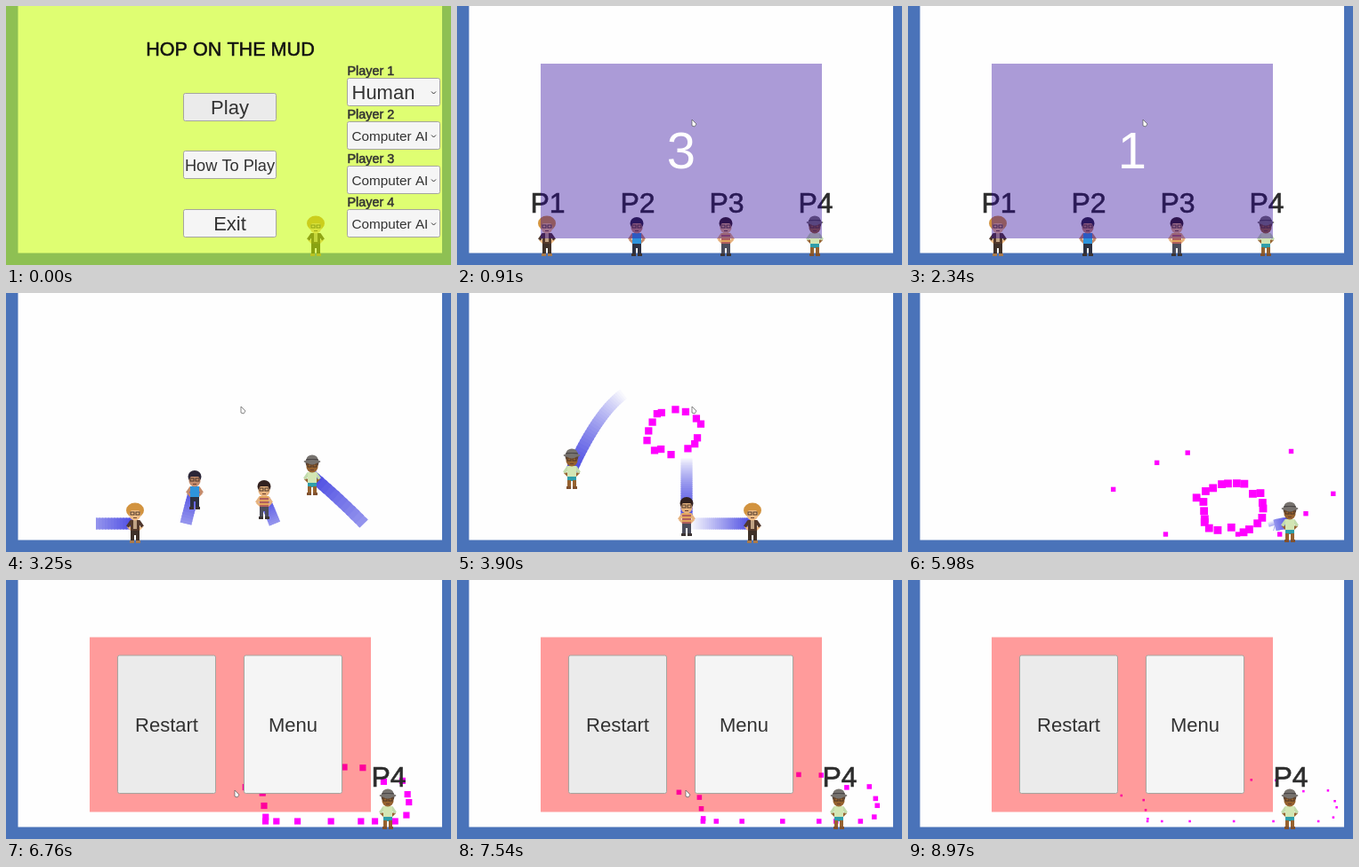
Animation, 500 px wide and 292 px high, one loop 9100 ms. Source, as an HTML page with a canvas:

```html
<!DOCTYPE html>
<html lang="en">
<head>
<meta charset="utf-8">
<title>Hop on the mud</title>
<style>
html, body { margin: 0; width: 100%; height: 100%; overflow: hidden; background: #fff; }
canvas { display: block; }
</style>
</head>
<body>
<canvas id="stage" width="500" height="292"></canvas>
<script>
const ctx = document.getElementById('stage').getContext('2d');
const LOOP = 9100, STEP = 130, TRAIL = 300;
const GAME = 390, TWO = 1300, ONE = 2340, START = 3120, OVER = 6370;
const FLOOR = 278, REST = 255, INK = '#323232';

// A path lists a few key points: time, x, y. A player with a burst breaks apart at the last one.
const players = [
  { name: 'P1', hair: '#d2933f', skin: '#efbd86', shirt: '#54392b', sleeve: '#4f382e', front: '#c0a284', legs: '#3f3129', shoes: '#a97a4c', curls: true,
    path: [[START, 101, 260], [3600, 262, 260], [3900, 332, 260], [4640, 175, 236], [4790, 130, 261], [4940, 167, 260], [5300, 352, 235]],
    burst: { count: 9, reach: 215, size: 6.8, life: 1200 } },
  { name: 'P2', hair: '#2b2637', skin: '#c48c6c', shirt: '#2e94dc', sleeve: '#c48c6c', legs: '#2d3142', shoes: '#3c3230',
    path: [[START, 202, 260], [3640, 243, 148]],
    burst: { count: 15, reach: 115, size: 8.8, life: 1800 } },
  { name: 'P3', hair: '#32211f', skin: '#e6b27e', shirt: '#e2a55c', sleeve: '#e6b27e', stripes: '#b0605e', legs: '#4c4d5b', shoes: '#3b3434',
    path: [[START, 302, 260], [3600, 258, 186], [3900, 258, 252], [4640, 180, 194], [4790, 134, 150], [4940, 166, 131], [5700, 362, 240]],
    burst: { count: 22, reach: 130, size: 9.4, life: 3400 } },
  { name: 'P4', hair: '#55433a', skin: '#96622f', shirt: '#d3e6b4', sleeve: '#c3dcae', legs: '#2f9eaa', shoes: '#80512f', hat: '#77736f',
    path: [[START, 402, 260], [3600, 187, 114], [3900, 129, 199], [4640, 353, 135], [4940, 402, 240], [5850, 412, 262], [5980, 429, 259]] }
];

const mix = (a, b, u) => a + (b - a) * u;
const clamp = (v, lo, hi) => Math.max(lo, Math.min(hi, v));
const deathOf = p => p.burst ? p.path.at(-1)[0] : Infinity;

function seeded(seed) {
  return () => {
    const v = Math.sin(++seed * 78.233) * 43758.5453;
    return v - Math.floor(v);
  };
}

function rect(color, x, y, w, h) {
  ctx.fillStyle = color;
  ctx.fillRect(x, y, w, h);
}

function oval(color, x, y, rx, ry) {
  ctx.fillStyle = color;
  ctx.beginPath();
  ctx.ellipse(x, y, rx, ry, 0, 0, 2 * Math.PI);
  ctx.fill();
}

function line(color, width, ...points) {
  ctx.strokeStyle = color;
  ctx.lineWidth = width;
  ctx.beginPath();
  points.forEach(p => ctx.lineTo(...p));
  ctx.stroke();
}

function text(str, x, y, size, color = INK, align = 'center', weight = 0) {
  ctx.font = `${size}px "Liberation Sans", Arial, sans-serif`;
  ctx.textAlign = align;
  ctx.fillStyle = ctx.strokeStyle = color;
  ctx.lineWidth = weight;
  ctx.fillText(str, x, y);
  if (weight) ctx.strokeText(str, x, y);
}

function box(x, y, w, h, fill = '#f5f5f5') {
  ctx.beginPath();
  ctx.roundRect(x + .5, y + .5, w - 1, h - 1, 2);
  ctx.fillStyle = fill;
  ctx.fill();
  ctx.strokeStyle = '#a5a59f';
  ctx.lineWidth = 1;
  ctx.stroke();
}

// Steady in x; in y, falls speed up and rises slow down
function position(path, t) {
  const next = path.findIndex(key => key[0] > t);
  if (next < 1) return path.at(next && -1).slice(1);
  const [t0, x0, y0] = path[next - 1], [t1, x1, y1] = path[next];
  const u = (t - t0) / (t1 - t0);
  return [mix(x0, x1, u), mix(y0, y1, u * (y1 > y0 ? 1 + u : 3 - u) / 2)];
}

function drawTrail(path, t) {
  const parts = 30, dt = TRAIL / parts;
  for (let i = 0; i < parts; i++) {
    const from = t - TRAIL + i * dt, u = (i + 1) / parts;
    const pale = mix(254, 76, u);
    line(`rgb(${pale},${pale},${mix(254, 226, u)})`, 13,
      position(path, from), position(path, Math.min(t, from + 1.5 * dt)));
  }
}

function drawPlayer(p, x, y) {
  ctx.save();
  ctx.translate(Math.round(x), Math.round(y) + 22);
  rect(p.legs, -5, -15, 10, 6);
  for (const side of [-1, 1]) {
    rect(p.hat ? p.skin : p.legs, side * 3 - 2, -10, 4, 8);
    rect(p.shoes, side * 3.5 - 2.5, -3, 5, 3);
    line(p.skin, 3, [side * 8, -19], [side * 4, -15]);
    line(p.sleeve, 3.5, [side * 4, -25], [side * 8.5, -18.5]);
  }
  rect(p.shirt, -5, -26, 10, 12);
  if (p.front) rect(p.front, -2, -26, 4, 10);
  if (p.stripes) for (let row = -24; row < -14; row += 4) rect(p.stripes, -5, row, 10, 2);
  if (p.curls) oval(p.hair, 0, -37, 10, 8.5);
  else oval(p.hair, 0, -37, 7.5, 7);
  oval(p.skin, 0, -32, 6.5, 6.5);
  rect(p.hair, -6, -40, 12, 3);
  for (const side of [-3, 3]) {
    ctx.strokeStyle = '#4a3527';
    ctx.lineWidth = 1;
    ctx.strokeRect(side - 2, -35, 4, 3);
  }
  rect('#6b4030', -2, -29, 4, 1);
  if (p.hat) {
    oval(p.hat, 0, -40, 6.5, 5.5);
    rect('#4b4747', -6.5, -41, 13, 2);
    oval(p.hat, 0, -38, 9.5, 2);
  }
  ctx.restore();
}

function drawLabel(p, x) {
  ctx.filter = 'blur(.6px)';
  text(p.name, x + 1, 232.5, 32, '#2c2c2c', 'center', .6);
  ctx.filter = 'none';
}

// Squares fly out in a ring that slows, flattens and settles near the floor
function drawBurst(p, t, seed) {
  const { count, reach, size, life } = p.burst;
  const [born, x, y] = p.path.at(-1), age = t - born;
  if (age < 0 || age > life) return;
  const random = seeded(seed);
  const spread = 1 - Math.exp(-age / 770), side = size - age * .0021;
  for (let i = 0; i < count; i++) {
    const angle = (i + random()) / count * 2 * Math.PI;
    const radius = reach * spread * mix(.75, 1.1, random());
    const px = clamp(x + radius * Math.cos(angle), 17, 484);
    const py = mix(y, REST, spread ** 2) + radius * Math.sin(angle) * (1 - .75 * spread);
    rect('#f0f', px - side / 2, Math.min(py, FLOOR - 6) - side / 2, side, side);
  }
}

function drawCursor(x, y) {
  ctx.save();
  ctx.translate(x, y);
  ctx.beginPath();
  ctx.lineTo(0, 0);
  ctx.lineTo(0, 7);
  ctx.lineTo(3, 8);
  ctx.lineTo(5, 5);
  ctx.closePath();
  ctx.fillStyle = '#fff';
  ctx.fill();
  ctx.strokeStyle = '#555';
  ctx.lineWidth = .7;
  ctx.stroke();
  ctx.restore();
}

function drawRoom() {
  rect('#4a73b9', 0, 0, 500, 292);
  rect('#fefefe', 13.5, 0, 476.5, FLOOR + .5);
}

function drawMenu(t) {
  drawPlayer(players[0], 348, 260);
  rect('rgba(199,255,0,.55)', 0, 0, 500, 292);
  text('HOP ON THE MUD', 252, 55.5, 21.6, '#111', 'center', .5);
  ['Play', 'How To Play', 'Exit'].forEach((name, i) => {
    const y = 98 + i * 65.5 | 0, size = i === 1 ? 18.2 : 22;
    box(199, y, 105, 32, i ? '#f5f5f5' : t < 260 ? '#ebebeb' : '#c8c8c8');
    text(name, 251.5, y + 16 + size * .36, size);
  });
  for (let i = 0; i < 4; i++) {
    const y = 81 + i * 49.4, top = Math.round(y);
    text('Player ' + (i + 1), 383.5, y - 3, 14.4, INK, 'left', .5);
    box(383, top, 105, 32);
    text(i ? 'Computer AI' : 'Human', 388.5, y + (i ? 22 : 24), i ? 15.3 : 22, INK, 'left');
    line(INK, 1, [478, top + 15.5], [480.5, top + 18], [483, top + 15.5]);
  }
}

function drawGame(t) {
  const alive = players.filter(p => t < deathOf(p));
  if (t >= START) alive.forEach(p => drawTrail(p.path, t));
  players.forEach((p, i) => p.burst && drawBurst(p, t, 20 * i));
  for (const p of alive) {
    const [x, y] = position(p.path, t);
    if (t < START || t >= OVER) drawLabel(p, x);
    drawPlayer(p, x, y);
  }
  if (t < START) {
    rect('rgba(41,0,153,.392)', 94, 65, 316, 197);
    text(t < TWO ? '3' : t < ONE ? '2' : '1', 252, 183, 58, '#fff');
  }
  if (t >= OVER) {
    rect('rgba(255,0,0,.392)', 94, 64.5, 316, 197);
    box(125, 84.5, 111, 156.5, '#ebebeb');
    box(267, 84.5, 111, 156.5);
    text('Restart', 180.5, 170.5, 22);
    text('Menu', 322.5, 170.5, 22);
  }
  if (t < 4300) drawCursor(264, 128);
  else if (t >= 6760 && t < 8400) drawCursor(257, 237);
}

function frame(now) {
  const t = Math.floor(now % LOOP / STEP) * STEP;
  drawRoom();
  (t < GAME ? drawMenu : drawGame)(t);
  requestAnimationFrame(frame);
}
requestAnimationFrame(frame);
</script>
</body>
</html>
```
